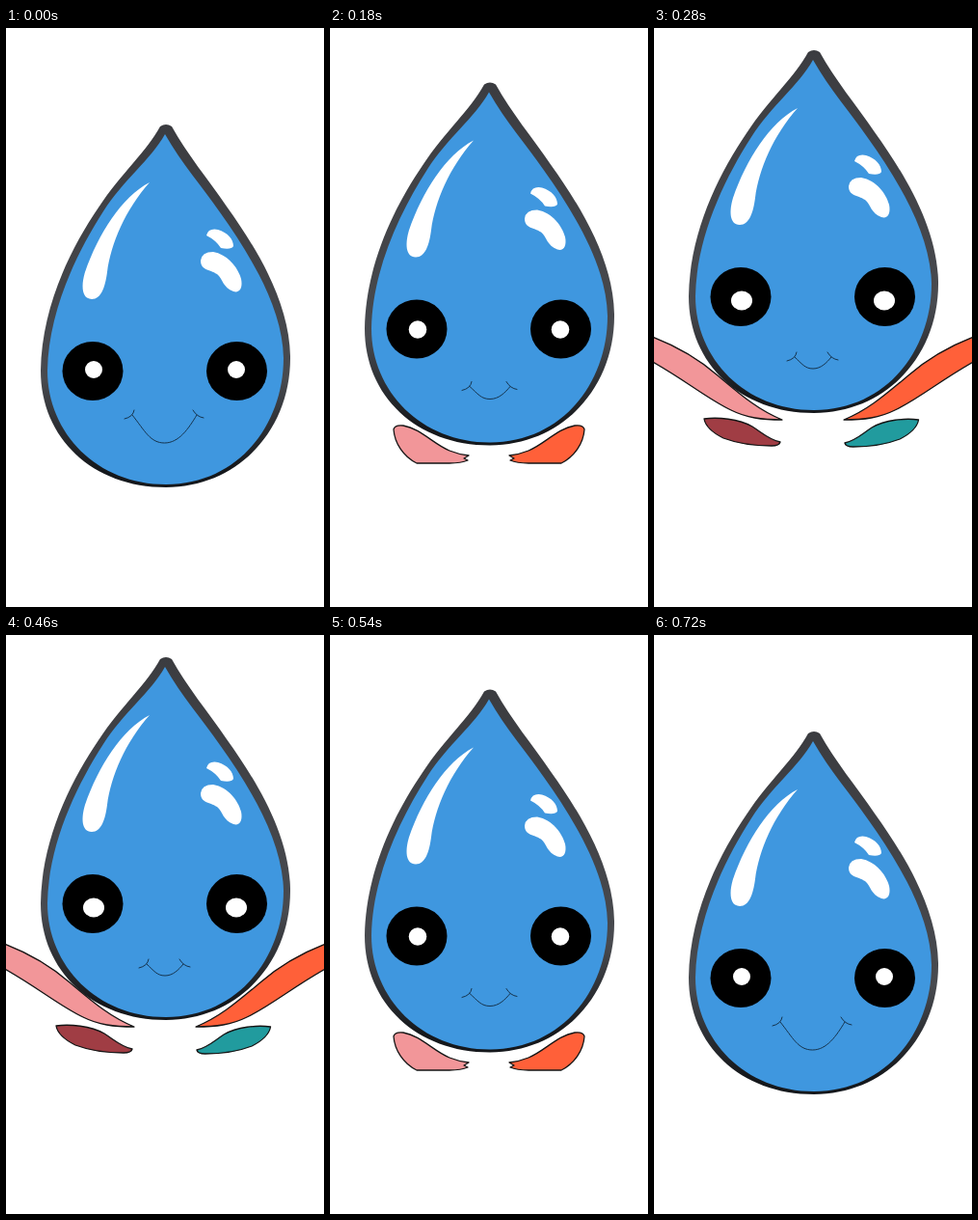
An HTML page that plays this animation: 330 by 600 pixels, repeating every 820 ms.

```html
<!DOCTYPE html>
<html lang="en">
<head>
<meta charset="utf-8">
<title>Bouncing water drop</title>
<style>
  html, body { margin: 0; width: 100%; height: 100%; overflow: hidden; background: #fff; }
  svg { display: block; width: 100%; height: 100%; }
  .petal path, .petal use { stroke: #151515; stroke-width: 1.3; stroke-linejoin: round; }
  .smile { fill: none; stroke: #16344e; stroke-width: 1; stroke-linecap: round; }
</style>
</head>
<body>
<svg viewBox="0 0 330 600">
  <defs>
    <linearGradient id="rim" x1="0" y1="0" x2="0" y2="1">
      <stop offset="0" stop-color="#3b3c40"/>
      <stop offset=".7" stop-color="#484a4f"/>
      <stop offset=".95" stop-color="#15181c"/>
    </linearGradient>
    <path id="bud" d="M66 416 Q67 411 76 412 C94 415 107 431 124 438 Q134 442 144 443 L139 446 L143 448 Q136 451 124 451 L90 451 C76 444 67 430 66 416Z"/>
    <path id="wing" d="M-30 311 C4 320 36 334 66 360 C90 380 108 396 133 406 C112 406 96 404 80 396 C50 382 20 354 -30 331Z"/>
    <path id="leaf" d="M52 405 C66 403 88 405 102 413 C113 420 120 427 131 429 Q130 433 122 433 C104 433 88 431 72 425 Q54 416 52 405Z"/>
  </defs>

  <g id="buds" class="petal">
    <use href="#bud" fill="#f29699"/>
    <use href="#bud" fill="#ff6039" transform="matrix(-1 0 0 1 330 0)"/>
  </g>
  <g id="wings" class="petal">
    <use href="#wing" fill="#f29699"/>
    <use href="#wing" fill="#ff6039" transform="matrix(-1 0 0 1 330 0)"/>
    <use href="#leaf" fill="#a03d44"/>
    <use href="#leaf" fill="#219b9e" transform="matrix(-.97 0 0 1 325 1)"/>
  </g>

  <g id="drop">
    <path fill="url(#rim)" d="M160 102 Q166 98 172 102 C188 131 210 157 229 185 C262 231 294 285 295 340 C296 415 242 476 166 476 C90 476 36 425 36 355 C37 290 66 230 96 186 C120 150 146 128 160 102Z"/>
    <path fill="#3f97df" d="M165 110 C182 140 204 165 222 191 C254 236 287 290 288 342 C288 412 240 473 166 473 C95 473 43 420 43 355 C44 295 72 235 101 190 C122 157 150 137 165 110Z"/>
    <g fill="#fff">
      <path d="M149 160 C120 175 96 213 82 253 C78 266 78 281 89 281 C99 281 103 268 105 253 C109 223 124 188 149 160Z"/>
      <path d="M208 215 Q210 207 220 209 C230 212 236 219 236 226 Q234 230 223 228 Q218 220 208 215Z"/>
      <path d="M202 241 Q203 232 215 232 C231 235 241 249 244 260 C246 270 242 275 236 273 C225 269 225 260 219 255 C211 250 202 251 202 241Z"/>
    </g>
    <ellipse cx="90" cy="355.5" rx="31.5" ry="30.5"/>
    <ellipse cx="239.5" cy="355.5" rx="31.5" ry="30.5"/>
    <ellipse class="pupil" cx="91" fill="#fff"/>
    <ellipse class="pupil" cx="239" fill="#fff"/>
    <path id="smile" class="smile"/>
  </g>
</svg>
<script>
const $ = id => document.getElementById(id);
const LOOP = 820;
const starts = [0, 100, 180, 280, 360, 460, 540, 640, 720];

// smile: left corner x, right corner x, corner y, bottom y
const poses = [
  { lift: 0,    pupil: [354, 9],    smile: [131, 198, 401, 430] },
  { lift: 21,   pupil: [354.5, 9],  smile: [138, 193, 408, 429], buds: "translate(31.5 161) scale(.71)" },
  { lift: 43.5, pupil: [356, 9.3],  smile: [145, 187, 415, 428], buds: "translate(0 0)" },
  { lift: 77,   pupil: [359.5, 11], smile: [146, 184, 418, 430], wings: "translate(0 0)" },
  { lift: 94,   pupil: [360, 11],   smile: [146, 184, 418, 430], wings: "translate(0 -17)" }
];

function smilePath([left, right, y, bottom]) {
  const width = right - left, depth = bottom - y;
  return `M${left} ${y} C${left + width * .2} ${y + depth * .58} ${left + width * .28} ${bottom} ${left + width / 2} ${bottom}
    S${right - width * .13} ${y + depth * .5} ${right} ${y}
    M${left - 8} ${y + 4} Q${left + 1} ${y + 2} ${left + 2} ${y - 5}
    M${right - 4} ${y - 5} Q${right} ${y + 2} ${right + 7} ${y + 3}`;
}

function placeSplash(id, transform) {
  $(id).style.display = transform ? "" : "none";
  if (transform) $(id).setAttribute("transform", transform);
}

function draw(now) {
  const time = now % LOOP;
  const step = starts.findLastIndex(start => time >= start);
  const pose = poses[Math.min(step, starts.length - 1 - step)];
  $("drop").setAttribute("transform", `translate(0 ${-pose.lift})`);
  $("smile").setAttribute("d", smilePath(pose.smile));
  const [y, radius] = pose.pupil;
  for (const pupil of document.querySelectorAll(".pupil")) {
    pupil.setAttribute("cy", y);
    pupil.setAttribute("rx", radius);
    pupil.setAttribute("ry", Math.min(radius, 10));
  }
  placeSplash("buds", pose.buds);
  placeSplash("wings", pose.wings);
}

const origin = performance.now();
function tick() {
  draw(performance.now() - origin);
  requestAnimationFrame(tick);
}
tick();
</script>
</body>
</html>
```
